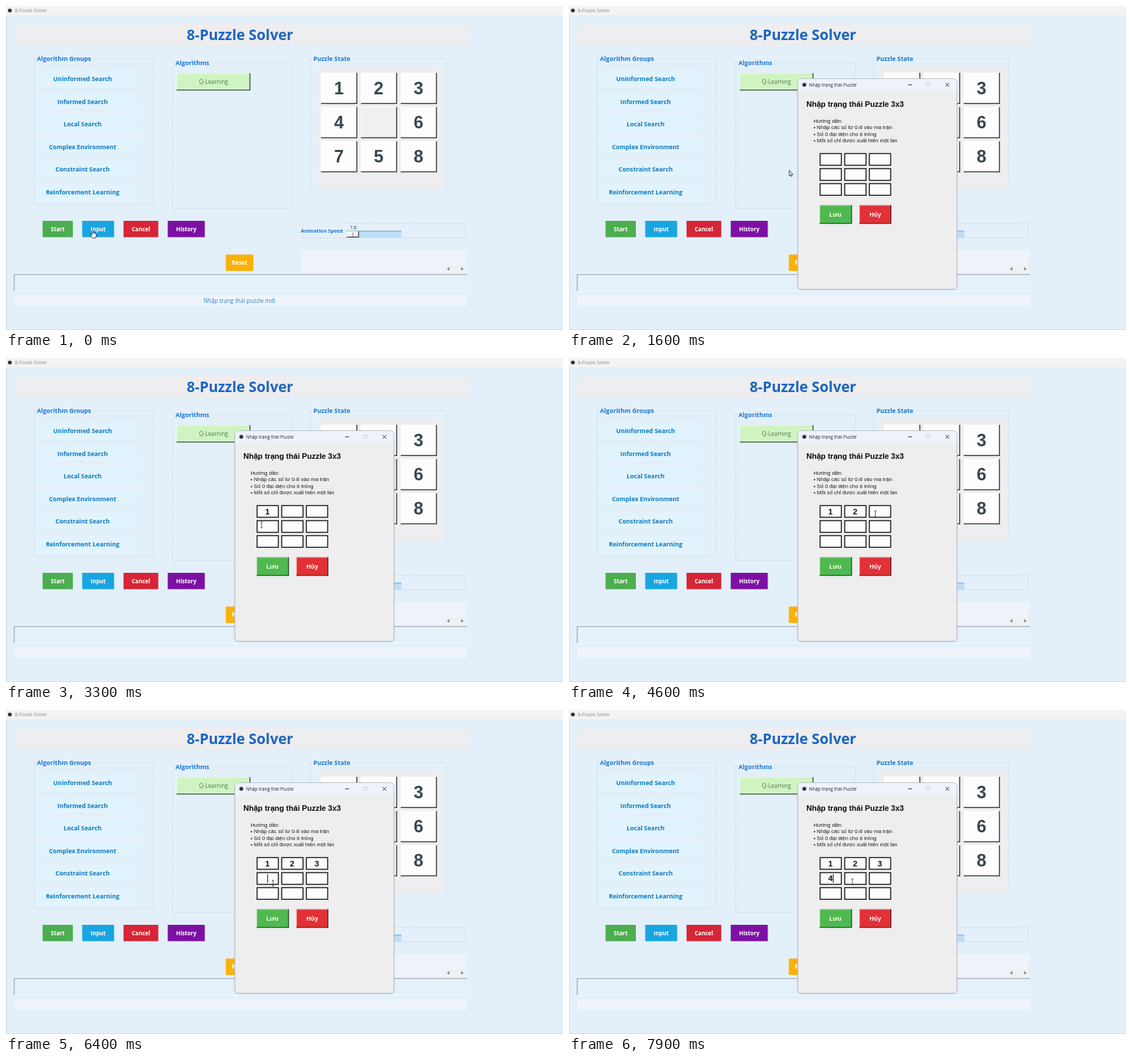
Write an HTML page that moves like this. It is 800x466 px and loops after 8 s.

```html
<!DOCTYPE html>
<html lang="vi">
<head>
<meta charset="utf-8">
<title>8-Puzzle Solver</title>
<style>
  html, body { margin: 0; width: 100%; height: 100%; overflow: hidden; background: #e3f0fa; }
  svg { display: block; width: 100vw; height: 100vh; }
  .ui { font-family: "Open Sans", "Noto Sans", sans-serif; }
  .arial { font-family: "Liberation Sans", Arial, sans-serif; }
</style>
</head>
<body>
<svg id="stage" viewBox="0 0 800 466"></svg>
<script>
const NS = "http://www.w3.org/2000/svg";
const stage = document.getElementById("stage");
const LOOP = 8000, STEP = 100;
const DIALOG_AT = 1100, PRESS_AT = 800;

let parent = stage;

function el(tag, attrs, content) {
  const node = document.createElementNS(NS, tag);
  for (const key in attrs) node.setAttribute(key, attrs[key]);
  if (content !== undefined) node.textContent = content;
  parent.appendChild(node);
  return node;
}

function group(draw) {
  const outer = parent;
  const g = el("g", {});
  parent = g;
  draw();
  parent = outer;
  return g;
}

const rect = (x, y, x2, y2, fill, extra) =>
  el("rect", { x, y, width: x2 - x, height: y2 - y, fill, ...extra });

const path = (d, stroke, width = 1, extra) =>
  el("path", { d, fill: "none", stroke, "stroke-width": width, ...extra });

const text = (x, y, size, fill, str, { bold, mid, font = "ui" } = {}) =>
  el("text", {
    x, y, fill, class: font, "font-size": size,
    "font-weight": bold ? 700 : 400,
    "text-anchor": mid ? "middle" : "start"
  }, str);

const bold = { bold: true };
const boldMid = { bold: true, mid: true };
const arialMid = { bold: true, mid: true, font: "arial" };

// Raised widget: light top-left edge, dark bottom-right edge
function raised(x, y, x2, y2, fill, light, dark, width = 1.3) {
  const box = rect(x, y, x2, y2, fill);
  path(`M${x + .5} ${y2}V${y + .5}H${x2}`, light, 1);
  path(`M${x} ${y2 - .6}H${x2 - .6}V${y}`, dark, width);
  return box;
}

// Group box whose top line leaves room for its title
function labelFrame(x, y, x2, y2, title, titleEnd) {
  path(`M${x + 3} ${y}H${x}V${y2}H${x2}V${y}H${titleEnd}`, "#cbdae4", 1, { "stroke-dasharray": "2 1.4" });
  text(x + 4, y + 3.2, 8.8, "#1976d2", title, bold);
}

function flatButton(x, y, x2, y2, fill, label) {
  const box = rect(x, y, x2, y2, fill);
  text((x + x2) / 2, (y + y2) / 2 + 3, 8.05, "#fff", label, boldMid);
  return box;
}

function drawMain() {
  rect(0, 0, 800, 466, "#e3f0fa");
  rect(0, 0, 800, 13.5, "#f3f3f3");
  path("M0.5 13V466M0 465.5H800", "#d3dfe8");
  el("circle", { cx: 5.5, cy: 6.5, r: 2.8, fill: "#2b3440" });
  ui.title = text(12.8, 9.2, 6.6, "#888", "8-Puzzle Solver");

  rect(12, 26, 662, 56, "#eeedef");
  text(336, 48.8, 20.7, "#1a66c0", "8-Puzzle Solver", boldMid);

  labelFrame(40.5, 75.5, 211.5, 285.5, "Algorithm Groups", 126);
  ["Uninformed Search", "Informed Search", "Local Search",
   "Complex Environment", "Constraint Search", "Reinforcement Learning"].forEach((name, i) => {
    const y = 105 + i * 32.5;
    rect(44, y - 12, 190, y + 12, "#e1f3fc");
    text(110, y + 3, 8.75, "#0b7bc1", name, boldMid);
  });

  labelFrame(239.5, 81.5, 410.5, 291.5, "Algorithms", 295);
  raised(245, 96.5, 351, 121.5, "#d0f4c1", "#e6fadd", "#3d4a3a");
  text(298, 112, 8.1, "#4c7a49", "Q-Learning", { mid: true });

  labelFrame(437.5, 75.5, 632, 262.5, "Puzzle State", 498);
  rect(446, 87, 629.5, 264, "#eeeef0");
  [1, 2, 3, 4, 0, 6, 7, 5, 8].forEach((n, i) => {
    const x = 452.5 + (i % 3) * 57.2, y = 96 + Math.floor(i / 3) * 49.2;
    raised(x, y, x + 52, y + 44.8, n ? "#fdfdfe" : "#f0f0f1", n ? "#fff" : "#fafafa", "#3b4146", 1.5);
    if (n) text(x + 25.6, y + 31, 25, "#37474f", n, arialMid);
  });

  flatButton(52.5, 309, 96, 332.5, "#4bae4f", "Start");
  ui.input = flatButton(109.5, 309, 155.3, 332.5, "#18a5e1", "Input");
  flatButton(168.8, 309, 218.7, 332.5, "#d62537", "Cancel");
  flatButton(232.3, 309, 285.5, 332.5, "#7d10a4", "History");
  flatButton(315.7, 357.5, 355.2, 381, "#fcb106", "Reset");

  path("M487 312.5H660V333.5H423.5", "#cbdae4", 1, { "stroke-dasharray": "2 1.4" });
  text(423.4, 326, 7.1, "#1976d2", "Animation Speed", bold);
  text(499, 321, 6.4, "#222", "1.0", { mid: true });
  rect(489, 323.5, 568, 333, "#bbdefa");
  path("M489 323.8H568", "#7d8d98", .8);
  raised(489.5, 324.2, 507, 333, "#f2f4f6", "#fff", "#3a3f44");
  path("M498.3 325.5V332", "#6c7378", .9);

  rect(424, 351.5, 660.5, 384, "#eff4fa");
  rect(630, 373, 660.5, 383.5, "#f0f0f1");
  el("path", { d: "M637 375.2V380.8L633 378ZM653.5 375.2V380.8L657.5 378Z", fill: "#8b8f92" });

  rect(11.5, 386, 662, 410.5, "#e5f1fa");
  path("M11.8 410V386.2H662", "#96a1a8", 1.1);
  path("M12 410.3H662", "#f3f8fc");
  rect(12, 416, 662, 431, "#eef4fa");
  ui.hint = text(335.3, 427, 8.2, "#2c80d4", "Nhập trạng thái puzzle mới", { mid: true });
}

const cellX = i => 360.6 + (i % 3) * 35.4;
const cellY = i => 212.3 + Math.floor(i / 3) * 21.6;
const CELL_W = 30.6, CELL_H = 16.8;

function drawDialog() {
  rect(327.5, 105, 558.5, 409, "#9fb2c0", { rx: 6, opacity: .3 });
  rect(328.8, 104.6, 557.2, 407.4, "#efeeef", { rx: 5, stroke: "#aebbc5", "stroke-width": .9 });
  el("path", { d: "M329.3 122V110Q329.3 105 334.3 105H551.7Q556.7 105 556.7 110V122Z", fill: "#eef3fa" });
  el("circle", { cx: 338, cy: 113.3, r: 2.8, fill: "#2b3440" });
  text(344.8, 115.7, 6.5, "#222", "Nhập trạng thái Puzzle");
  path("M487 113.4H492.8M540.8 110.6L546.2 116M546.2 110.6L540.8 116", "#222", .9);
  rect(514, 110.8, 518.8, 115.6, "none", { stroke: "#c4c8cc", "stroke-width": .8, rx: .8 });

  text(341, 144.8, 11.05, "#080808", "Nhập trạng thái Puzzle 3x3", { bold: true, font: "arial" });
  ["Hướng dẫn:", "• Nhập các số từ 0-8 vào ma trận", "• Số 0 đại diện cho ô trống",
   "• Mỗi số chỉ được xuất hiện một lần"].forEach((line, i) =>
    text(351.3, 168.2 + i * 9.15, 7.68, "#1c1c1c", line, { font: "arial" }));

  for (let i = 0; i < 9; i++) {
    rect(cellX(i), cellY(i), cellX(i) + CELL_W, cellY(i) + CELL_H, "#fdfdfd",
      { stroke: "#141414", "stroke-width": 1.4 });
    ui.digits.push(text(cellX(i) + 15, cellY(i) + 12.4, 11.6, "#111", "", arialMid));
  }
  ui.caret = rect(0, 0, 1, 12.5, "#111");

  raised(360, 286.5, 406.3, 313.2, "#4fb950", "#86d386", "#2f4a30");
  text(382.6, 302.8, 8.9, "#fff", "Lưu", arialMid);
  raised(417, 286.5, 463, 313.2, "#e23036", "#f08286", "#54282a");
  text(440, 302.8, 8.9, "#fff", "Hủy", arialMid);
}

function drawCursors() {
  ui.arrow = group(() => el("path", {
    d: "M0 0V8L1.8 6.4L3 9L4.2 8.5L3 6H5.4Z",
    fill: "#fff", stroke: "#222", "stroke-width": .8, "stroke-linejoin": "round"
  }));
  ui.hand = group(() => el("path", {
    d: "M-.9 .8Q0 -.8 .9 .8V4L4.6 4.9Q5.4 5.3 5.2 6.6L4.3 11.2H-.2L-3.3 7.2Q-3.2 5.8 -1.9 6.4L-.9 7.2Z",
    fill: "#fff", stroke: "#222", "stroke-width": .8, "stroke-linejoin": "round"
  }));
  ui.beam = group(() => path("M-1.6 -4H1.6M0 -4V4M-1.6 4H1.6", "#444", .9));
}

const ui = { digits: [] };
drawMain();
ui.dialog = group(drawDialog);
drawCursors();

// Pointer stops: time, x, y
const stops = [
  [0, 124.5, 322.5], [1400, 124.5, 322.5], [1600, 316.3, 236.3], [2100, 372, 222],
  [2900, 372, 222], [3300, 367, 240], [3600, 410, 222], [4200, 410, 222],
  [4600, 440, 224], [5300, 440, 224], [5900, 383.5, 249], [7500, 383.5, 249],
  [7900, 407, 247], [8000, 407, 247]
];
// Focus changes and key presses: time, cell, digit
const edits = [
  [2200, 0], [2600, 0, 1], [3600, 1], [3950, 1, 2],
  [4700, 2], [5100, 2, 3], [5900, 3], [7400, 3, 4]
];

function pointerAt(t) {
  const i = Math.max(1, stops.findIndex(s => s[0] >= t));
  const [t0, x0, y0] = stops[i - 1], [t1, x1, y1] = stops[i];
  const k = (t - t0) / (t1 - t0), e = k * k * (3 - 2 * k);
  return [x0 + (x1 - x0) * e, y0 + (y1 - y0) * e];
}

const show = (node, on) => node.setAttribute("display", on ? "inline" : "none");

function overCell(x, y) {
  for (let i = 0; i < 9; i++)
    if (x >= cellX(i) && x <= cellX(i) + CELL_W && y >= cellY(i) && y <= cellY(i) + CELL_H) return true;
  return false;
}

function update(t) {
  const open = t >= DIALOG_AT;
  const pressed = t >= PRESS_AT && !open;
  const [x, y] = pointerAt(t);
  const onInput = x > 109 && x < 156 && y > 309 && y < 333;
  const onCell = open && overCell(x, y);

  ui.title.setAttribute("fill", pressed ? "#222" : "#888");
  ui.input.setAttribute("fill", pressed ? "#5bbef0" : "#18a5e1");
  show(ui.hint, onInput);
  show(ui.dialog, open);

  const done = edits.filter(e => e[0] <= t);
  ui.digits.forEach((node, i) => {
    const key = done.find(e => e[1] === i && e[2]);
    node.textContent = key ? key[2] : "";
  });

  const last = done[done.length - 1];
  show(ui.caret, last && (t - last[0]) % 900 < 600);
  if (last) {
    ui.caret.setAttribute("x", cellX(last[1]) + (last[2] ? 18.3 : 14.7));
    ui.caret.setAttribute("y", cellY(last[1]) + 2.2);
  }

  show(ui.hand, onInput);
  show(ui.beam, onCell);
  show(ui.arrow, !onInput && !onCell);
  for (const c of [ui.hand, ui.beam, ui.arrow]) c.setAttribute("transform", `translate(${x} ${y})`);
}

const start = performance.now();
function frame() {
  const t = (performance.now() - start) % LOOP;
  update(Math.floor(t / STEP) * STEP);
  requestAnimationFrame(frame);
}
frame();
</script>
</body>
</html>
```
